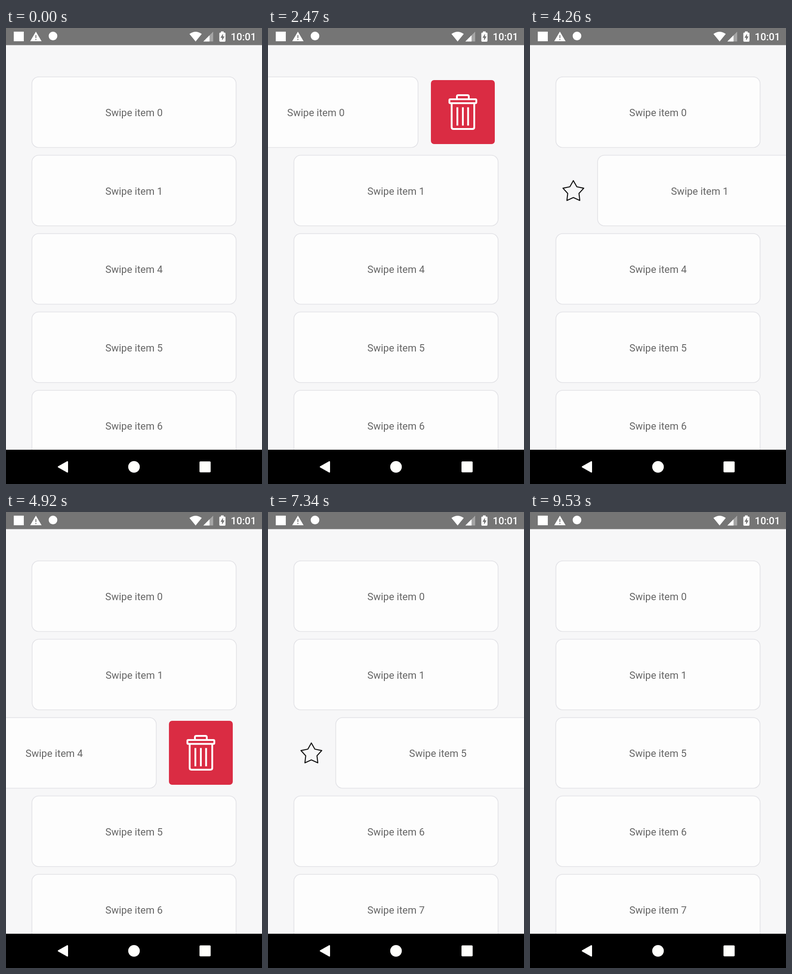
Write an HTML page that moves like this. It is 561x998 px and loops after 9570 ms.

```html
<!DOCTYPE html>
<html lang="en">
<head>
<meta charset="utf-8">
<title>Swipe list</title>
<style>
  html, body { margin: 0; width: 100%; height: 100%; overflow: hidden; background: #f7f7f8; }
  svg { display: block; width: 100%; height: 100%; }
  text { font-family: Roboto, sans-serif; font-size: 22px; }
  .card rect { fill: #fdfdfd; stroke: #e2e2e6; stroke-width: 1.6; }
  .card text { fill: #666; text-anchor: middle; }
</style>
</head>
<body>
<svg viewBox="0 0 561 998">
  <defs>
    <g id="trash">
      <rect x="-70" y="-70" width="140" height="140" rx="7" fill="#da2c43"/>
      <g fill="none" stroke="#fff" stroke-width="4" stroke-linejoin="round">
        <path d="M-13 -29V-34Q-13 -37 -10 -37H10Q13 -37 13 -34V-29"/>
        <rect x="-29.5" y="-28" width="59" height="8.5" rx="2"/>
        <path d="M-24.500 -19V33Q-24.500 37 -20.500 37H21Q25 37 25 33V-19M-12 -10.500V29.500M0 -10.500V29.500M11.500 -10.500V29.500"/>
      </g>
    </g>
    <path id="star" fill="none" stroke="#111" stroke-width="2.2" stroke-linejoin="round"/>
  </defs>
  <rect width="561" height="998" fill="#f7f7f8"/>
  <g id="list"></g>

  <rect width="561" height="37.500" fill="#757575"/>
  <g fill="#fff">
    <rect x="17" y="8" width="22" height="21"/>
    <path d="M65.500 8L78 29H53Z"/>
    <path d="M65.500 15.500V22M65.500 24V26.500" stroke="#757575" stroke-width="2"/>
    <circle cx="103" cy="17.500" r="9.500"/>
    <path d="M402 13Q415.500 3.500 429 13L415.500 29.500Z"/>
    <path d="M432.500 29.500L454 8V29.500Z" opacity=".35"/>
    <path d="M432.500 29.500L446 16V29.500Z"/>
    <path d="M471 10V7.500H477V10H479Q481 10 481 12V28Q481 30 479 30H469.500Q467.500 30 467.500 28V12Q467.500 10 469.500 10Z"/>
    <path d="M475.500 12.500L470 21.500H473.500V27.500L479 18.500H475.500Z" fill="#757575"/>
    <text x="492.500" y="27" font-weight="500">10:01</text>
  </g>

  <rect y="923" width="561" height="75" fill="#000"/>
  <g fill="#fffffc">
    <path d="M115 960.500L134.500 949.500V971.500Z" stroke="#fffffc" stroke-width="3" stroke-linejoin="round"/>
    <circle cx="280.500" cy="960.500" r="12.700"/>
    <rect x="424" y="948.500" width="24.500" height="24" rx="2"/>
  </g>
</svg>
<script>
const LOOP = 9570, TOP = 107, PITCH = 171.5, REMOVE_AT = 5700, COLLAPSE = 410;
const OPEN_LEFT = -175.5, OPEN_RIGHT = 91;

// Each move: start time, destination, drag duration (none means a spring).
const items = [
  { label: 0, moves: [[1240, -176, 680], [1920, OPEN_LEFT], [2955, 0]] },
  { label: 1, moves: [[2930, 188, 580], [3700, OPEN_RIGHT], [4400, 0]] },
  { label: 4, moves: [[4380, -160, 160], [4540, OPEN_LEFT]] },
  { label: 5, moves: [[6670, 125, 250], [6920, OPEN_RIGHT], [8660, -80, 300], [8960, 0]] },
  { label: 6, moves: [] },
  { label: 7, moves: [] }
];
const REMOVED = 2;

const smooth = p => (1 - Math.cos(Math.PI * Math.max(0, Math.min(1, p)))) / 2;
const spring = ms => 1 - (1 + ms * 0.0136) * Math.exp(-ms * 0.0136);

function offsetAt(moves, t) {
  let x = 0;
  moves.forEach(([start, to, drag], i) => {
    if (t <= start) return;
    const next = moves[i + 1];
    const ms = Math.min(t, next ? next[0] : t) - start;
    x += (to - x) * (drag ? smooth(ms / drag) : spring(ms));
  });
  return x;
}

const starPoints = Array.from({ length: 10 }, (_, i) => {
  const r = i % 2 ? 13 : 24, a = i * Math.PI / 5;
  return (r * Math.sin(a)).toFixed(2) + " " + (-r * Math.cos(a)).toFixed(2);
});
document.getElementById("star").setAttribute("d", "M" + starPoints.join("L") + "Z");

const list = document.getElementById("list");
list.innerHTML = items.map(({ label }) => `<g>
  <use href="#trash"/><use href="#star"/>
  <g class="card"><rect x="56.7" width="447.6" height="154.5" rx="15"/>
  <text x="280.5" y="86">Swipe item ${label}</text></g></g>`).join("");
items.forEach((item, i) => {
  item.row = list.children[i];
  [item.trash, item.star, item.card] = item.row.children;
});

function showButton(el, amount, x, y, minScale) {
  el.style.display = amount > 0 ? "" : "none";
  const scale = minScale + (1 - minScale) * Math.min(1, amount);
  el.setAttribute("transform", `translate(${x} ${y}) scale(${scale})`);
}

function draw(t) {
  if (t > 4600 && t < 4790) t = 4600; // brief stall during the swipe
  const lift = PITCH * smooth((t - REMOVE_AT) / COLLAPSE);
  items.forEach((item, i) => {
    const x = offsetAt(item.moves, t);
    const y = TOP + i * PITCH - (i > REMOVED ? lift : 0);
    item.row.style.display = i === REMOVED && t >= REMOVE_AT ? "none" : "";
    item.row.setAttribute("transform", `translate(0 ${y})`);
    item.card.setAttribute("transform", `translate(${x} 0)`);
    showButton(item.trash, x / OPEN_LEFT, 427, 77, 0.742);
    showButton(item.star, x / OPEN_RIGHT, 95, 251 - PITCH, 0.742);
  });
}

function frame() {
  draw(performance.now() % LOOP);
  requestAnimationFrame(frame);
}
frame();
</script>
</body>
</html>
```
